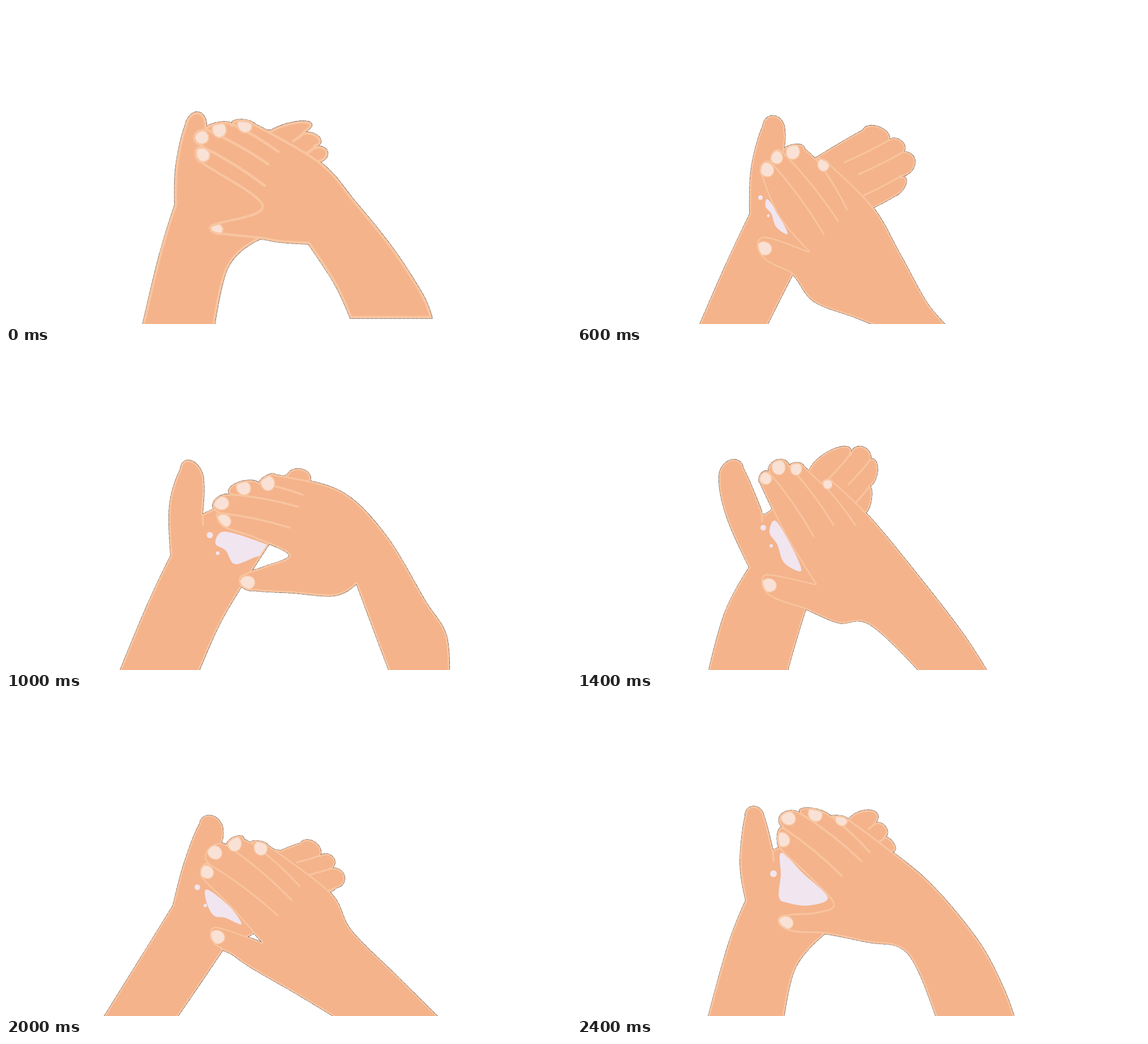
An HTML page with a canvas for the animation above (2600 ms loop, 998 by 561 pixels).

```html
<!DOCTYPE html>
<html lang="en">
<head>
<meta charset="utf-8">
<title>Hand washing</title>
<style>
html, body { margin: 0; width: 100%; height: 100%; overflow: hidden; background: #fff; }
canvas { display: block; width: 998px; height: 561px; }
</style>
</head>
<body>
<canvas id="stage" width="998" height="561"></canvas>
<script>
const ctx = document.getElementById('stage').getContext('2d');
const SKIN = '#f4b38b', EDGE = '#f8c5a0', NAIL = '#f9e1d5', FOAM = '#f1e5f0', RIM = 'rgba(75,55,45,.8)';
const STEP = 200;

// "x y" pairs; "!" marks a corner, "^" the top of a round fingertip
const parse = s => {
  const t = s.trim().split(/\s+/), pts = [];
  for (let i = 0; i + 1 < t.length; i += 2) {
    pts.push({ x: parseFloat(t[i]), y: parseFloat(t[i + 1]), kind: t[i + 1].replace(/[\d.-]/g, '') });
  }
  return pts;
};

// back: direction of the lines between the rear fingers
// ends: where the front finger lines stop
const pose = (w, p) => {
  const out = { w, size: [{ x: p.drop || 0, y: 0 }] };
  for (const k of ['left', 'right', 'back', 'ends', 'foam', 'dot']) out[k] = parse(p[k] || '');
  return out;
};

const closed = pose(5, {
  left: `237 580! 271 438 298 351! 300 282 316 212 339 187^ 354 216! 468 219! 528 203^ 528 223!
    554 232^ 547 248! 568 257^ 555 275! 449 411! 392 462 366 580!`,
  right: `608 551! 580 490 534 420! 485 417 449 411 385 404 360 396^ 371 383 451 352 345 278 333 260^
    344 247! 331 229^ 352 217! 375 205^ 400 209! 413 200^ 440 208 555 275 618 346 684 428 737 510 753 551!`,
  back: '-20 15', ends: '457 317 463 279 481 257'
});

const open = pose(4, {
  left: `240 590! 260 452 279 366! 266 270 262 210 277 186^ 296 202 326 298! 341 269 424 202! 476 169^
    495 184! 520 187^ 519 205! 542 211^ 528 247! 543 260^ 505 300! 386 446! 374 497 356 590!`,
  right: `523 580! 480 505 430 464 386 446 345 406 304 382 288 364^ 300 350 376 376! 346 282 320 185
    331 163^ 344 165! 357 147^ 376 160! 389 152^ 404 168 425 203! 434 199^ 446 208 505 302 550 392
    590 485 642 580!`,
  back: '-42 31', ends: '398 298 440 289 468 291',
  foam: '344 283 365 335 367 359 349 342 335 333 344 311', dot: '337 309', drop: 3
});

const tilted = pose(3, {
  left: `226 590! 261 460 304 380! 264 290 251 222 270 191^ 294 206 326 280! 341 280 411 207! 456 170^
    483 180! 504 167^ 519 189! 531 208^ 517 237! 520 260^ 510 283! 404 454! 381 530 365 590!`,
  right: `620 580! 519 482 462 478 404 454 372 444 344 432 326 408^ 338 392 421 409! 370 326 324 232
    324 216^ 338 211! 354 190^ 375 201! 388 195^ 400 201 432 231! 441 224^ 452 228 510 283 585 372
    680 494 735 580!`,
  back: '-40 45', ends: '418 325 453 305 492 306',
  foam: '351 298 380 345 396 386 366 372 354 340 340 318', dot: '329 310', drop: 5
});

const spread = pose(3, {
  left: `211 575! 262 458 305 367! 308 285 328 212 350 194^ 367 222 365 256! 421 268! 505 219 533 213^
    552 236! 573 238^ 577 257! 597 278^ 571 301! 581 314^ 560 336 523 356! 381 474! 350 535 330 575!`,
  right: `555 575! 490 549 418 521 381 474 342 454 318 423^ 338 408 409 433! 357 372 326 300 326 279^
    342 275! 347 256^ 362 257! 384 244^ 402 252 422 270! 433 269^ 446 278 523 355 572 440 620 526
    664 575!`,
  back: '-80 40', ends: '436 403 461 379 477 359',
  foam: '337 341 357 370 372 402 352 390 343 366 333 354', dot: '324 338', drop: 4
});

const slid = pose(3, {
  left: `165 575! 238 458 295 366! 315 290 342 222 365 208^ 383 235 380 257! 485 269! 520 256 545 254^
    555 278! 577 280^ 576 300! 598 315^ 583 335! 580 338^ 577 340 571 343! 383 445! 330 523 294 575!`,
  right: `600 575! 520 526 435 477 400 453 378 441 360 418^ 374 404 452 431! 395 367 346 318 344 300^
    357 292! 358 264^ 389 259! 406 244^ 420 249 433 255! 446 252^ 462 259 572 342 610 410 690 490
    776 575!`,
  back: '-41 12', ends: '479 383 505 357 519 332',
  foam: '356 338 395 368 416 399 388 388 366 383 353 356', dot: '338 334', drop: 5
});

const wide = pose(3.5, {
  left: `196 575! 250 445 291 359! 289 270 308 207 330 193^ 349 228 347 286! 497 216! 524 207^ 537 228!
    416 414! 375 485 336 575!`,
  right: `683 580! 638 460 619 409! 580 430 505 425 440 421 413 410^ 422 391 455 379 500 358 440 329
    388 311 372 294^ 377 284! 367 264^ 395 251! 410 230^ 447 231! 460 218^ 475 216 590 245 670 322
    740 438 778 500 783 580!`,
  back: '0 0', ends: '501 310 516 273 524 252',
  foam: '384 317 440 332 476 350 440 362 404 374 388 350 370 338', dot: '360 323', drop: 5.5
});

const cupped = pose(3.5, {
  left: `227 580! 267 435 298 357! 288 290 297 208 312 191^ 330 208 346 268! 481 212! 520 198^ 527 221!
    545 227^ 545 245! 561 259^ 557 271! 438 416! 385 478 363 580!`,
  right: `640 580! 602 480 570 440 515 431 438 416 385 413 355 396^ 372 382 425 377 452 362 405 311
    358 266 354 240^ 364 229! 362 204^ 394 203! 413 194^ 449 209! 459 207^ 474 210 557 271 630 333
    710 430 755 515 778 580!`,
  back: '-12 10', ends: '468 314 503 288 517 272',
  foam: '361 273 400 310 443 352 410 366 375 362 357 352 360 312', dot: '347 310', drop: 6
});

const blend = (p, q, t) => ({ x: p.x + (q.x - p.x) * t, y: p.y + (q.y - p.y) * t, kind: p.kind });
const PARTS = ['left', 'right', 'back', 'ends', 'foam', 'dot', 'size'];
function mix(a, b, t, parts = PARTS) {
  const out = { ...a, w: a.w + (b.w - a.w) * t };
  for (const k of parts) out[k] = a[k].map((p, i) => blend(p, b[k][i], t));
  return out;
}
const move = (p, dy, dx = 0) => ({ ...p, dy, dx });

const steps = [
  closed,
  open,
  mix(open, tilted, .65),
  spread,
  mix(open, tilted, .6),
  wide,
  move(mix(cupped, wide, .4, ['right', 'ends']), 0, 10),
  tilted,
  move(mix(open, tilted, .62), 4),
  move(mix(spread, slid, .18), 4),
  slid,
  move(wide, -5),
  cupped
];

const add = (p, q, k) => ({ x: p.x + q.x * k, y: p.y + q.y * k });
const sub = (p, q) => ({ x: p.x - q.x, y: p.y - q.y });
const rise = (a, tip, b) => sub(tip, blend(a, b, .5));

function outline(pts) {
  const path = new Path2D(), n = pts.length, at = i => pts[(i + n) % n];
  path.moveTo(pts[0].x, pts[0].y);
  pts.forEach((b, i) => {
    const a = at(i - 1), c = at(i + 1), d = at(i + 2);
    let p, q;
    if (c.kind === '^') {
      p = add(b, rise(b, c, d), .55);
      q = add(c, sub(d, b), -.275);
    } else if (b.kind === '^') {
      p = add(b, sub(c, a), .275);
      q = add(c, rise(a, b, c), .55);
    } else {
      q = c.kind ? c : add(c, sub(d, b), -1 / 6);
      p = b.kind ? blend(b, q, .4) : add(b, sub(c, a), 1 / 6);
    }
    path.bezierCurveTo(p.x, p.y, q.x, q.y, c.x, c.y);
  });
  path.closePath();
  return path;
}

const corners = pts => pts.filter(p => p.kind === '!');

function crease(a, b, bend = 0) {
  const d = sub(b, a), m = add(blend(a, b, .5), { x: d.y, y: -d.x }, bend);
  ctx.beginPath();
  ctx.moveTo(a.x, a.y);
  ctx.quadraticCurveTo(m.x, m.y, b.x, b.y);
  ctx.stroke();
}

function disc(p, r) {
  ctx.beginPath();
  ctx.arc(p.x, p.y, r, 0, 7);
  ctx.fill();
}

function rim(path) {
  ctx.strokeStyle = RIM;
  ctx.lineWidth = 1.7;
  ctx.setLineDash([6, 2]);
  ctx.stroke(path);
  ctx.setLineDash([]);
}

function hand(path, w, details) {
  ctx.save();
  ctx.fillStyle = SKIN;
  ctx.fill(path);
  ctx.clip(path);
  ctx.strokeStyle = EDGE;
  ctx.lineWidth = w;
  details();
  ctx.lineWidth = w * 1.7;
  ctx.stroke(path);
  ctx.restore();
}

function rear(p) {
  const c = corners(p.left), web = c[2];
  crease(web, add(web, { x: 1, y: 19 }, 1));
  for (const v of c.slice(4, -3)) crease(v, add(v, p.back[0], 1), .03);
  ctx.fillStyle = FOAM;
  if (p.foam.length) ctx.fill(outline(p.foam));
  for (const d of p.dot) {
    disc(d, p.size[0].x);
    disc(add(d, { x: 14, y: 32 }, 1), p.size[0].x * .6);
  }
}

function front(p) {
  corners(p.right).slice(-4, -1).forEach((v, i) => crease(v, p.ends[i], .05));
  p.right.forEach((tip, i) => {
    if (tip.kind !== '^') return;
    const a = p.right[i - 1], b = p.right[i + 1], h = rise(a, tip, b);
    const chord = sub(b, a), r = Math.min(15, Math.hypot(chord.x, chord.y) / 2);
    const mid = add(tip, h, -.9 * r / Math.hypot(h.x, h.y));
    ctx.beginPath();
    ctx.ellipse(mid.x, mid.y, r * .85, r * .75, Math.atan2(h.y, h.x), 0, 7);
    ctx.stroke();
    ctx.fillStyle = NAIL;
    ctx.fill();
  });
}

function draw(p) {
  const left = outline(p.left), right = outline(p.right), dx = p.dx || 0;
  ctx.fillStyle = '#fff';
  ctx.fillRect(0, 0, 998, 561);
  ctx.save();
  ctx.lineCap = ctx.lineJoin = 'round';
  ctx.translate(0, p.dy || 0);
  rim(left);
  ctx.translate(dx, 0);
  rim(right);
  ctx.translate(-dx, 0);
  hand(left, p.w, () => rear(p));
  ctx.translate(dx, 0);
  hand(right, p.w, () => front(p));
  ctx.restore();
}

const start = performance.now();
let shown = -1;
function tick() {
  const i = Math.floor((performance.now() - start) / STEP) % steps.length;
  if (i !== shown) draw(steps[shown = i]);
  requestAnimationFrame(tick);
}
tick();
</script>
</body>
</html>
```
